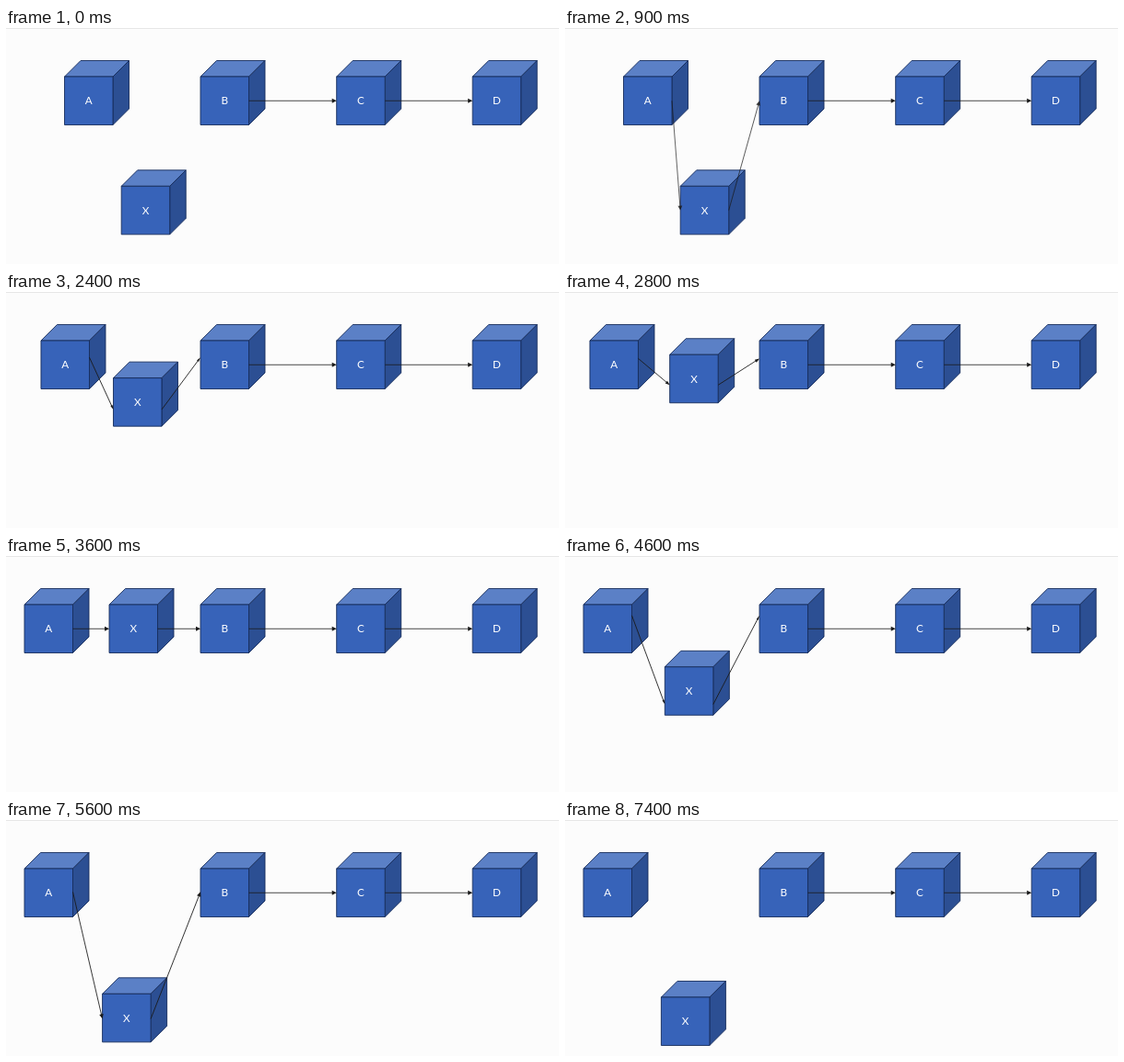
Animation, 600 px wide and 257 px high, one loop 8 s. Source, as an HTML page with a canvas:

```html
<!DOCTYPE html>
<html lang="en">
<head>
<meta charset="utf-8">
<title>Inserting and removing a list node</title>
<style>
html, body { margin: 0; height: 100%; overflow: hidden; background: #fcfcfc; }
canvas { display: block; }
</style>
</head>
<body>
<canvas id="stage" width="600" height="257"></canvas>
<script>
const ctx = document.getElementById('stage').getContext('2d');
const LOOP = 8000, SIZE = 52.5, DEPTH = 17.5, ROW = 53;
const EDGE = '#172d5c', INK = '#1a1a1a';

const clamp = v => Math.min(1, Math.max(0, v));
const ramp = (t, start, length) => clamp((t - start) / length);
const mix = (a, b, p) => a + (b - a) * p;
// Quick start, long soft landing
const ease = u => 1 - (1 - u ** 1.25) ** 2.4;

function polygon(points, fill, stroke) {
  ctx.beginPath();
  points.forEach(([x, y]) => ctx.lineTo(x, y));
  ctx.closePath();
  ctx.fillStyle = fill;
  ctx.fill();
  if (stroke) {
    ctx.strokeStyle = stroke;
    ctx.lineWidth = 0.9;
    ctx.stroke();
  }
}

function cube(label, x, y) {
  const r = x + SIZE, b = y + SIZE, d = DEPTH;
  polygon([[x, y], [x + d, y - d], [r + d, y - d], [r, y]], '#5b80c6', EDGE);
  polygon([[r, y], [r + d, y - d], [r + d, b - d], [r, b]], '#2c4f93', EDGE);
  polygon([[x, y], [r, y], [r, b], [x, b]], '#3763b9', EDGE);
  ctx.fillStyle = '#fff';
  ctx.fillText(label, x + SIZE / 2, y + SIZE / 2 + 4.2);
}

function arrow(x1, y1, x2, y2, headScale = 1) {
  const angle = Math.atan2(y2 - y1, x2 - x1);
  const length = Math.hypot(x2 - x1, y2 - y1);
  const half = 2.4 * headScale;
  ctx.save();
  ctx.translate(x2, y2);
  ctx.rotate(angle);
  ctx.strokeStyle = INK;
  ctx.lineWidth = 0.8;
  ctx.beginPath();
  ctx.moveTo(-length, 0);
  ctx.lineTo(-2, 0);
  ctx.stroke();
  polygon([[0, 0], [-5, -half], [-5, half]], INK);
  ctx.restore();
}

function draw(t) {
  const rise = ease(ramp(t, 1515, 2000));
  const drop = ease(ramp(t, 3960, 2000));
  const falling = t >= 3960;

  const a = mix(63.5, 20, rise ** 1.28);
  const x = falling ? mix(112, 104.4, drop) : mix(125.2, 112, rise);
  const y = falling ? mix(ROW, 193, drop) : mix(172.3, ROW, rise);
  const b = 211, c = 358.7, d = 506.2;

  ctx.fillStyle = '#fcfcfc';
  ctx.fillRect(0, 0, 600, 257);
  ctx.fillStyle = '#e6e6e6';
  ctx.fillRect(0, 0, 600, 1);

  ctx.font = '11.7px Lato, Carlito, "Open Sans", sans-serif';
  ctx.textAlign = 'center';
  cube('A', a, ROW);
  cube('B', b, ROW);
  cube('C', c, ROW);
  cube('D', d, ROW);
  cube('X', x, y);

  const mid = ROW + SIZE / 2;
  arrow(b + SIZE, mid, c, mid);
  arrow(c + SIZE, mid, d, mid);

  // While moving, the links stretch beyond the node centres
  const span = falling ? 140 * drop ** 0.51 : 119.3 * (1 - rise) ** 0.69;
  const centre = (mid + y + SIZE / 2) / 2;
  const high = centre - span / 2, low = centre + span / 2;
  const p = falling ? drop : rise;
  const head = 1 - 2.2 * p * (1 - p);

  ctx.globalAlpha = ramp(t, 50, 1050) * (1 - ramp(t, 6850, 500));
  arrow(a + SIZE, high, x, low, head);
  arrow(x + SIZE, low, b, high, head);
  ctx.globalAlpha = 1;
}

function tick() {
  draw(performance.now() % LOOP);
  requestAnimationFrame(tick);
}
tick();
</script>
</body>
</html>
```
